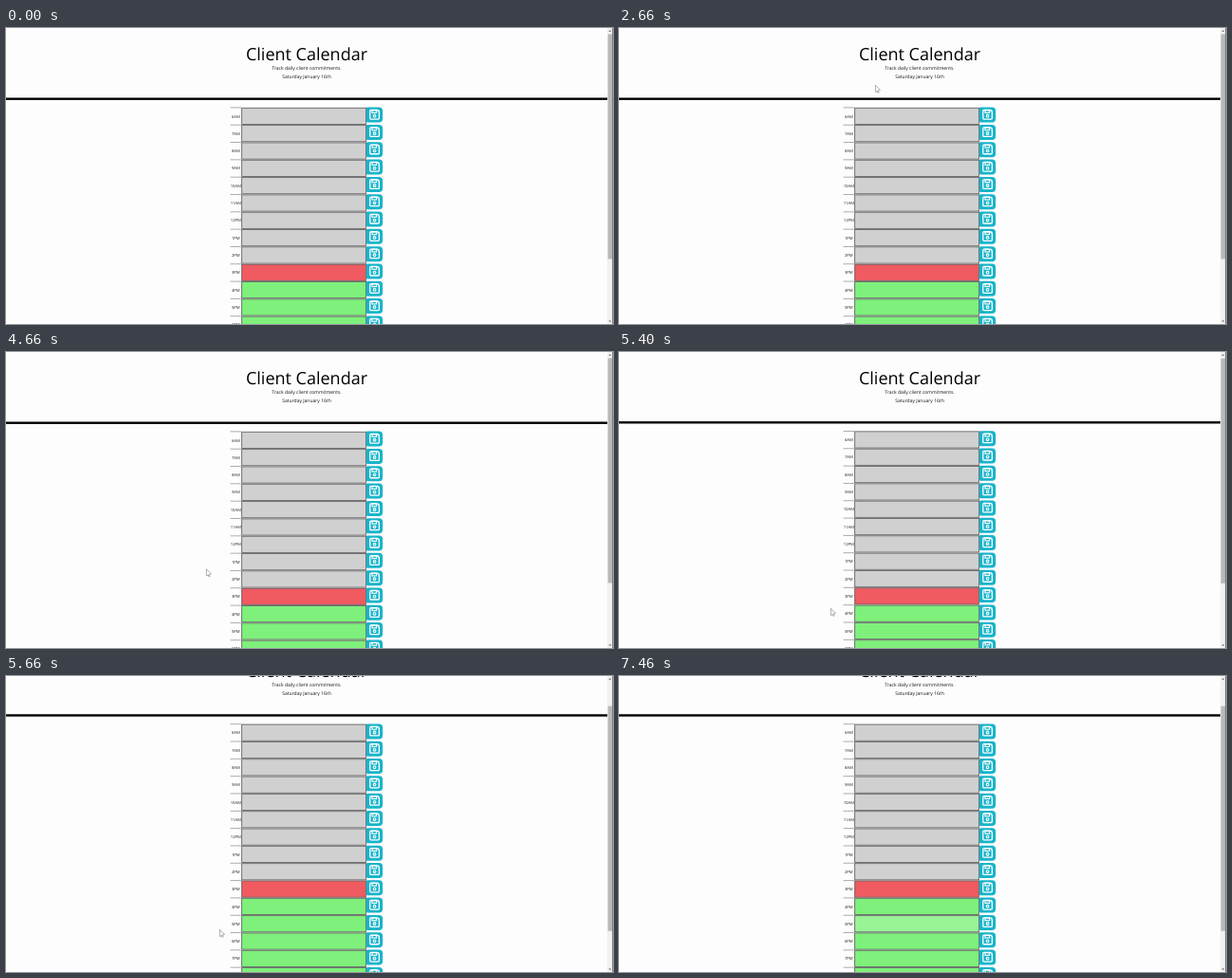
Recreate the animation shown at these times as an HTML page with a canvas. Size 640 by 312 pixels, loop 8000 ms.

```html
<!DOCTYPE html>
<html lang="en">
<head>
<meta charset="utf-8">
<title>Client Calendar</title>
<style>
  html, body { margin: 0; width: 100%; height: 100%; overflow: hidden; background: #fdfdfd; }
  canvas { display: block; width: 640px; height: 312px; }
</style>
</head>
<body>
<canvas id="stage" width="640" height="312"></canvas>
<script>
const ctx = document.getElementById('stage').getContext('2d');
const LOOP = 8000, STEP = 200 / 3;
const ROW_TOP = 83.9, ROW_H = 18.32, ROWS = 16, NOW = 9, HOVERED = 11;
const SCROLL = 33.2, SCROLL_START = 5388, HOVER_START = 5980;
const FONT = '"Open Sans", "Noto Sans", sans-serif';

// Where the pointer pauses or turns
const STOPS = [
  { t: 1330, x: 151, y: 274.5 },
  { t: 2130, x: 268, y: 62 },
  { t: 2660, x: 270, y: 60 },
  { t: 4000, x: 290, y: 48 },
  { t: 4660, x: 211, y: 228.5 },
  { t: 5400, x: 223, y: 270 },
  { t: 5660, x: 225, y: 267 },
  { t: 6000, x: 250, y: 262 }
];

const lerp = (a, b, k) => a + (b - a) * k;
const ease = v => {
  v = Math.min(1, Math.max(0, v));
  return v * v * (3 - 2 * v);
};

function pointerAt(t) {
  const next = STOPS.findIndex(s => s.t > t + 5);
  if (next < 1) return null;
  const a = STOPS[next - 1], b = STOPS[next];
  const k = ease((t - a.t) / (b.t - a.t));
  return { x: lerp(a.x, b.x, k), y: lerp(a.y, b.y, k) };
}

function rect(x, y, w, h, color) {
  ctx.fillStyle = color;
  ctx.fillRect(x, y, w, h);
}

function line(x1, y1, x2, y2, color, width) {
  ctx.strokeStyle = color;
  ctx.lineWidth = width;
  ctx.beginPath();
  ctx.moveTo(x1, y1);
  ctx.lineTo(x2, y2);
  ctx.stroke();
}

function round(x, y, w, h, r) {
  ctx.beginPath();
  ctx.roundRect(x, y, w, h, r);
}

function text(str, x, y, size, color = '#111') {
  ctx.font = `${size}px ${FONT}`;
  ctx.textAlign = 'center';
  ctx.textRendering = 'geometricPrecision';
  ctx.fillStyle = color;
  ctx.fillText(str, x, y);
}

function saveButton(y) {
  ctx.fillStyle = '#18b4ca';
  round(380, y, 17.2, 16, [1, 4, 4, 1]);
  ctx.fill();
  ctx.strokeStyle = '#fff';
  ctx.lineWidth = 1.3;
  round(383.8, y + 2.9, 9.6, 9.6, [1, 2.6, 1, 1]);
  ctx.stroke();
  ctx.lineWidth = 1.1;
  ctx.strokeRect(386, y + 3.1, 4.6, 2.7);
  ctx.beginPath();
  ctx.arc(388.6, y + 9.1, 1.35, 0, 2 * Math.PI);
  ctx.stroke();
}

function row(i, hover) {
  const y = ROW_TOP + i * ROW_H, hour = i + 6;
  const label = (hour > 12 ? hour - 12 : hour) + (hour < 12 ? 'AM' : 'PM');
  line(236.5, y, 248, y, '#888', 0.7);
  text(label, 242.3, y + 10.6, 4.2, '#222');

  const fill = i < NOW ? '#d0d0d0' : i === NOW ? '#f05a61' : hover ? '#99f397' : '#7ef07b';
  rect(248.5, y + 0.2, 131, 17.6, fill);
  ctx.strokeStyle = '#686868';
  ctx.lineWidth = 0.9;
  ctx.strokeRect(248.6, y + 0.4, 131, 17.2);
  saveButton(y - 0.3);
}

function page(offset, hover) {
  ctx.save();
  ctx.translate(0, -offset);
  text('Client Calendar', 317, 34.2, 18, '#000');
  text('Track daily client commitments.', 317, 44, 5);
  text('Saturday January 16th', 317, 53, 5);
  rect(0, 73.5, 634, 2.4, '#000');
  for (let i = 0; i < ROWS; i++) row(i, hover && i === HOVERED);
  ctx.restore();
}

function triangle(x, y, half, h) {
  ctx.fillStyle = '#555';
  ctx.beginPath();
  ctx.moveTo(x - half, y);
  ctx.lineTo(x, y + h);
  ctx.lineTo(x + half, y);
  ctx.fill();
}

function scrollbar(offset) {
  rect(634, 0, 6, 312, '#f1f1f1');
  rect(634.6, 6.5 + offset * 0.76, 4.6, 237, '#b9b9b9');
  rect(639.3, 0, 0.7, 312, '#555');
  triangle(636.8, 3.8, 1.4, -1.6);
  triangle(636.8, 308.4, 1.4, 1.6);
}

function pointer({ x, y }) {
  ctx.save();
  ctx.translate(x + 0.4, y + 0.3);
  ctx.beginPath();
  ctx.moveTo(0, 0);
  ctx.lineTo(0, 7.2);
  ctx.lineTo(5, 5.1);
  ctx.closePath();
  ctx.fillStyle = '#fff';
  ctx.fill();
  ctx.strokeStyle = '#777';
  ctx.lineWidth = 0.6;
  ctx.stroke();
  line(2.2, 5.6, 3.3, 8, '#777', 1.6);
  line(2, 5.2, 3.1, 7.6, '#fff', 0.8);
  ctx.restore();
}

function draw(now) {
  const t = Math.floor((now % LOOP + 6) / STEP) * STEP;
  const offset = SCROLL * ease((t - SCROLL_START) / 180);
  const at = pointerAt(t);
  rect(0, 0, 640, 312, '#fdfdfd');
  page(offset, t >= HOVER_START);
  scrollbar(offset);
  if (at) pointer(at);
}

const start = performance.now();
function frame() {
  draw(performance.now() - start);
  requestAnimationFrame(frame);
}
frame();
</script>
</body>
</html>
```
